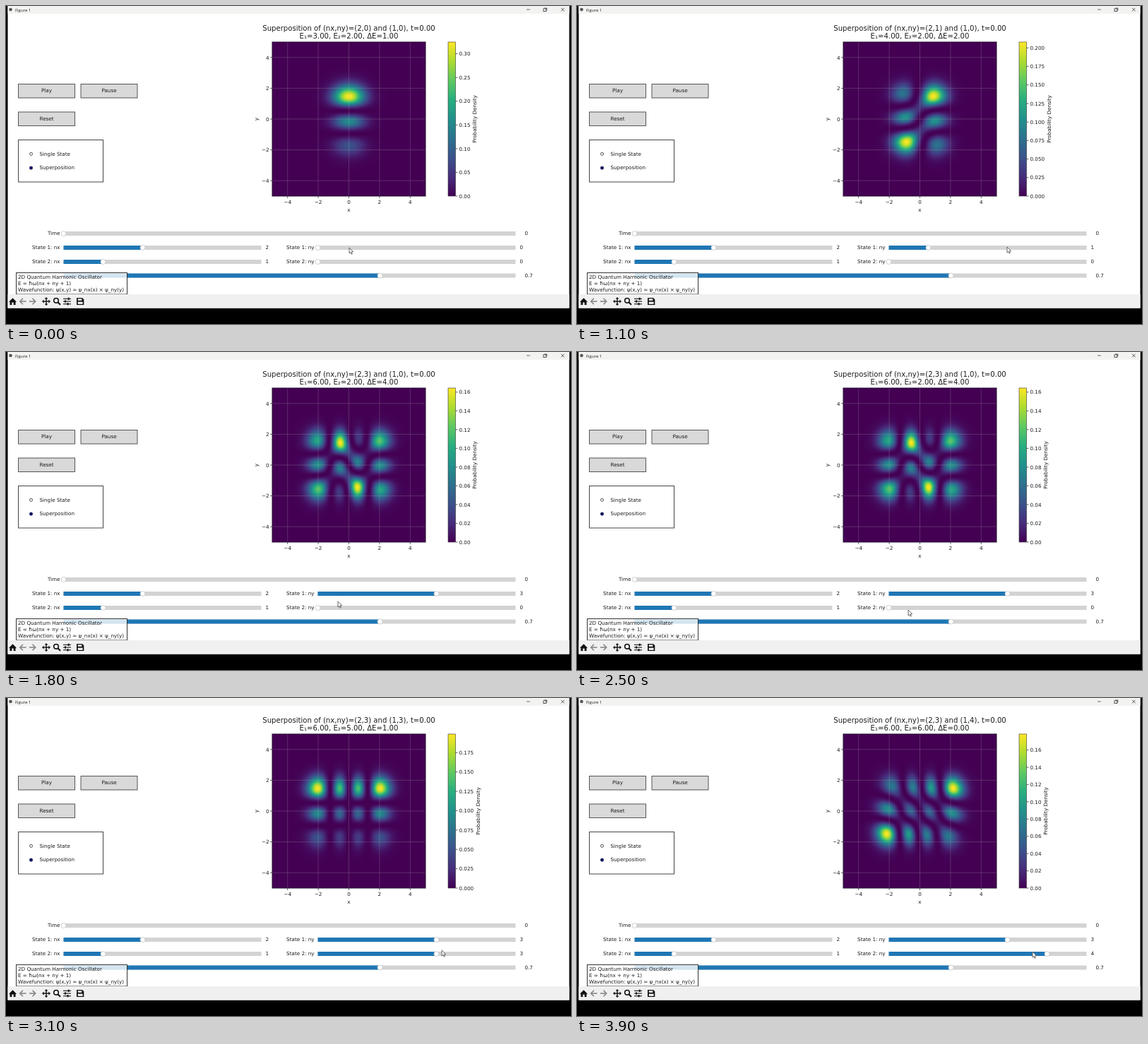
Animation of 800 by 450 pixels, one loop 4000 ms. Source, as an HTML page with a canvas:

```html
<!DOCTYPE html>
<html lang="en">
<head>
<meta charset="utf-8">
<title>Quantum harmonic oscillator</title>
<style>
html, body { margin: 0; width: 100%; height: 100%; overflow: hidden; background: #000; }
canvas { display: block; width: 800px; height: 450px; }
</style>
</head>
<body>
<canvas id="stage" width="800" height="450"></canvas>
<script>
const ctx = document.getElementById('stage').getContext('2d');
const LOOP = 4000, STEP = 100;
const PLOT = { x: 377, y: 51, w: 217, h: 218 };
const BAR = { x: 626, y: 51, w: 10.5, h: 218 };
const BLUE = '#1f77b4', TRACK = '#d3d3d3', INK = '#1c1c1c';
const SANS = '"DejaVu Sans", sans-serif';
const MIX = 0.7;

// [time, ny of state 1, ny of state 2]
const STATES = [[0, 0, 0], [600, 1, 0], [1200, 3, 0], [2700, 3, 1], [3000, 3, 3], [3400, 3, 4]];

// [time, x, y] of the pointer tip
const POINTER = [
  [0, 486, 342], [700, 488, 342], [800, 489, 342], [1100, 609, 341], [1300, 619, 334],
  [1800, 470, 353], [2500, 469, 365], [2700, 470, 364], [3000, 612, 359], [3100, 617, 357],
  [3400, 644, 359], [4000, 645, 359]
];

const VIRIDIS = ['440154', '472d7b', '3b528b', '2c728e', '21918c', '28ae80', '5ec962', 'addc30', 'fde725']
  .map(hex => [0, 2, 4].map(i => parseInt(hex.slice(i, i + 2), 16)));

function viridis(v) {
  const p = Math.min(Math.max(v, 0), 1) * (VIRIDIS.length - 1);
  const i = Math.min(Math.floor(p), VIRIDIS.length - 2);
  return VIRIDIS[i].map((c, k) => c + (VIRIDIS[i + 1][k] - c) * (p - i));
}

// Normalised oscillator eigenfunction by recurrence
function psi(n, x) {
  let prev = 0, cur = Math.PI ** -0.25 * Math.exp(-x * x / 2);
  for (let k = 1; k <= n; k++) {
    [prev, cur] = [cur, Math.sqrt(2 / k) * x * cur - Math.sqrt((k - 1) / k) * prev];
  }
  return cur;
}

const fields = {};
function field(n1, n2) {
  const key = n1 + ',' + n2;
  if (fields[key]) return fields[key];
  const size = 218, norm = Math.hypot(MIX, 1 - MIX);
  const axis = Array.from({ length: size }, (_, i) => (i + 0.5) / size * 10 - 5);
  const sample = n => axis.map(v => psi(n, v));
  const a = sample(n1), b = sample(n2), up1 = sample(2), up2 = sample(1);
  const density = new Float32Array(size * size);
  let max = 0;
  for (let r = 0; r < size; r++) {
    const j = size - 1 - r;
    for (let c = 0; c < size; c++) {
      const d = ((MIX * up1[j] * a[c] + (1 - MIX) * up2[j] * b[c]) / norm) ** 2;
      density[r * size + c] = d;
      max = Math.max(max, d);
    }
  }
  const image = document.createElement('canvas');
  image.width = image.height = size;
  const g = image.getContext('2d'), data = g.createImageData(size, size);
  density.forEach((d, i) => data.data.set([...viridis(d / max), 255], i * 4));
  g.putImageData(data, 0, 0);
  return fields[key] = { image, max };
}

function rect(x, y, w, h, fill, stroke) {
  if (fill) { ctx.fillStyle = fill; ctx.fillRect(x, y, w, h); }
  if (stroke) { ctx.strokeStyle = stroke; ctx.lineWidth = 1; ctx.strokeRect(x, y, w, h); }
}

function line(points, color, width = 1) {
  ctx.beginPath();
  points.forEach(([x, y]) => ctx.lineTo(x, y));
  ctx.strokeStyle = color;
  ctx.lineWidth = width;
  ctx.stroke();
}

function shape(points, fill) {
  ctx.beginPath();
  points.forEach(([x, y]) => ctx.lineTo(x, y));
  ctx.closePath();
  ctx.fillStyle = fill;
  ctx.fill();
}

function circle(x, y, r, fill, stroke, width = 0.8) {
  ctx.beginPath();
  ctx.arc(x, y, r, 0, Math.PI * 2);
  if (fill) { ctx.fillStyle = fill; ctx.fill(); }
  if (stroke) { ctx.strokeStyle = stroke; ctx.lineWidth = width; ctx.stroke(); }
}

function text(s, x, y, align = 'left', size = 7.2, font = SANS) {
  ctx.font = size + 'px ' + font;
  ctx.textAlign = align;
  ctx.fillStyle = INK;
  ctx.fillText(s, x, y);
}

function verticalText(s, x, y) {
  ctx.save();
  ctx.translate(x, y);
  ctx.rotate(-Math.PI / 2);
  text(s, 0, 0, 'center');
  ctx.restore();
}

function slider(label, x, y, w, share, value) {
  rect(x, y - 3, w, 6, TRACK);
  rect(x, y - 3, w * share, 6, BLUE);
  circle(x + w * share, y, 3.5, '#fff', '#c4c4c4');
  text(label, x - 5, y + 2.4, 'right');
  text(value, x + w + 6, y + 2.4);
}

function button(label, x, y) {
  rect(x + 0.5, y + 0.5, 80, 19.5, '#d9d9d9', '#555');
  text(label, x + 40.5, y + 12.2, 'center');
}

function drawWindow() {
  rect(0, 0, 800, 450, '#000');
  rect(2.5, 0, 795, 427.5, '#fff');
  rect(2.5, 0, 795, 11, '#f3f4f2');
  circle(6.5, 5, 2.3, '#555');
  text('Figure 1', 13, 7.5, 'left', 6, '"Open Sans", sans-serif');
  line([[737, 5], [742, 5]], '#444', 0.8);
  ctx.strokeStyle = '#333';
  ctx.lineWidth = 0.8;
  ctx.strokeRect(761, 3.8, 3.8, 3.8);
  line([[762.3, 3], [765.8, 3], [765.8, 6.4]], '#333', 0.8);
  line([[786, 2.8], [790.6, 7.4]], '#333', 0.8);
  line([[790.6, 2.8], [786, 7.4]], '#333', 0.8);
}

function drawToolbar() {
  rect(2.5, 408, 795, 19.5, '#f0f0f0');
  shape([[4, 418.7], [9.5, 413.2], [15, 418.7], [13.5, 418.7], [13.5, 423], [10.7, 423],
    [10.7, 419.6], [8.3, 419.6], [8.3, 423], [5.5, 423], [5.5, 418.7]], '#111');
  for (const [x, d] of [[19, 1], [42.5, -1]]) {
    line([[x + d * 9.5, 418], [x + d, 418]], '#858585', 1.6);
    line([[x + d * 5, 413.8], [x + d * 0.8, 418], [x + d * 5, 422.2]], '#858585', 1.6);
  }
  line([[52, 418], [62, 418]], '#111', 1.4);
  line([[57, 413], [57, 423]], '#111', 1.4);
  for (let k = 0; k < 4; k++) {
    ctx.save();
    ctx.translate(57, 418);
    ctx.rotate(k * Math.PI / 2);
    shape([[6, 0], [3.4, -2.4], [3.4, 2.4]], '#111');
    ctx.restore();
  }
  circle(71, 416.8, 3.3, null, '#111', 1.6);
  line([[73.4, 419.2], [77, 422.8]], '#111', 2);
  [[414.3, 88.7], [418, 84], [421.7, 87.5]].forEach(([y, x]) => {
    line([[81, y], [92, y]], '#111', 1.1);
    rect(x - 1, y - 1.6, 2, 3.2, '#111');
  });
  shape([[100, 413], [108, 413], [110.3, 415.3], [110.3, 423], [100, 423]], '#111');
  rect(101.7, 414.2, 5.6, 2.6, '#f0f0f0');
  rect(101.7, 418.6, 6.9, 3.2, '#f0f0f0');
}

function drawControls(n1, n2) {
  button('Play', 17, 110);
  button('Pause', 105.5, 110);
  button('Reset', 17, 149.5);
  rect(17.5, 189.5, 120, 59.5, '#fff', '#444');
  circle(35.5, 209.3, 2, '#fff', '#222');
  circle(35.5, 229.1, 2.2, '#10106a', '#10103a', 0.6);
  text('Single State', 47.5, 211.6);
  text('Superposition', 47.5, 231.4);

  slider('Time', 81.5, 322, 640, 0, '');
  text('0', 734.5, 324.4);
  slider('State 1: nx', 81.5, 342, 280, 0.4, '2');
  slider('State 2: nx', 81.5, 362, 280, 0.2, '1');
  slider('State 1: ny', 441.5, 342, 280, n1 / 5, String(n1));
  slider('State 2: ny', 441.5, 362, 280, n2 / 5, String(n2));
  slider('', 81.5, 381.5, 640, MIX, '');
  text('0.7', 734.5, 383.9);

  rect(14.5, 377.5, 157, 30.5, 'rgba(255,255,255,0.8)', '#333');
  text('2D Quantum Harmonic Oscillator', 17, 386);
  text('E = ħω(nx + ny + 1)', 17, 395);
  text('Wavefunction: ψ(x,y) = ψ_nx(x) × ψ_ny(y)', 17, 403.6);
}

function drawPlot(n1, n2) {
  const { image, max } = field(n1, n2);
  const e1 = 3 + n1, e2 = 2 + n2;
  text(`Superposition of (nx,ny)=(2,${n1}) and (1,${n2}), t=0.00`, 485.5, 34.6, 'center', 10.1);
  text(`E₁=${e1.toFixed(2)}, E₂=${e2.toFixed(2)}, ΔE=${Math.abs(e1 - e2).toFixed(2)}`,
    485.5, 46.3, 'center', 10.1);

  ctx.drawImage(image, PLOT.x, PLOT.y, PLOT.w, PLOT.h);
  for (let v = -4; v <= 4; v += 2) {
    const x = PLOT.x + PLOT.w * (v + 5) / 10, y = PLOT.y + PLOT.h * (5 - v) / 10;
    const label = String(v).replace('-', '−');
    line([[x, PLOT.y], [x, PLOT.y + PLOT.h]], 'rgba(176,176,176,0.3)', 0.8);
    line([[PLOT.x, y], [PLOT.x + PLOT.w, y]], 'rgba(176,176,176,0.3)', 0.8);
    line([[x, 269], [x, 272]], '#222', 0.7);
    line([[374, y], [377, y]], '#222', 0.7);
    text(label, x, 279.7, 'center');
    text(label, 372.5, y + 2.7, 'right');
  }
  rect(PLOT.x, PLOT.y, PLOT.w, PLOT.h, null, '#22102c');
  text('x', 485.5, 290.5, 'center');
  verticalText('y', 357, 160);

  const ramp = ctx.createLinearGradient(0, BAR.y + BAR.h, 0, BAR.y);
  VIRIDIS.forEach((c, i) => ramp.addColorStop(i / (VIRIDIS.length - 1), `rgb(${c})`));
  rect(BAR.x, BAR.y, BAR.w, BAR.h, ramp);
  ctx.strokeStyle = '#333';
  ctx.lineWidth = 0.6;
  ctx.strokeRect(BAR.x, BAR.y, BAR.w, BAR.h);
  const step = [0.02, 0.025, 0.05].find(s => max / s <= 9) || 0.1;
  const fine = step === 0.025;
  for (let k = 0; k * step <= max; k++) {
    const y = BAR.y + BAR.h * (1 - k * step / max);
    line([[636.5, y], [639.5, y]], '#222', 0.7);
    text((k * step).toFixed(fine ? 3 : 2), 641.5, y + 2.7);
  }
  verticalText('Probability Density', fine ? 670.5 : 666, 160);
}

function drawPointer(t) {
  const i = POINTER.findIndex(p => p[0] > t);
  const [t0, x0, y0] = POINTER[i - 1], [t1, x1, y1] = POINTER[i];
  const u = (t - t0) / (t1 - t0), s = u * u * (3 - 2 * u);
  ctx.save();
  ctx.translate(x0 + (x1 - x0) * s, y0 + (y1 - y0) * s);
  const arrow = [[0, 0], [0, 8], [1.9, 6.4], [3.1, 9.2], [4.4, 8.6], [3.2, 5.9], [5.6, 5.7], [0, 0]];
  shape(arrow, '#fff');
  line(arrow, '#444', 0.8);
  ctx.restore();
}

function draw(t) {
  const [, n1, n2] = STATES.filter(s => s[0] <= t).pop();
  drawWindow();
  drawPlot(n1, n2);
  drawControls(n1, n2);
  drawToolbar();
  drawPointer(t);
}

STATES.forEach(([, n1, n2]) => field(n1, n2));
function tick() {
  draw(Math.floor(performance.now() % LOOP / STEP) * STEP);
  requestAnimationFrame(tick);
}
tick();
</script>
</body>
</html>
```
